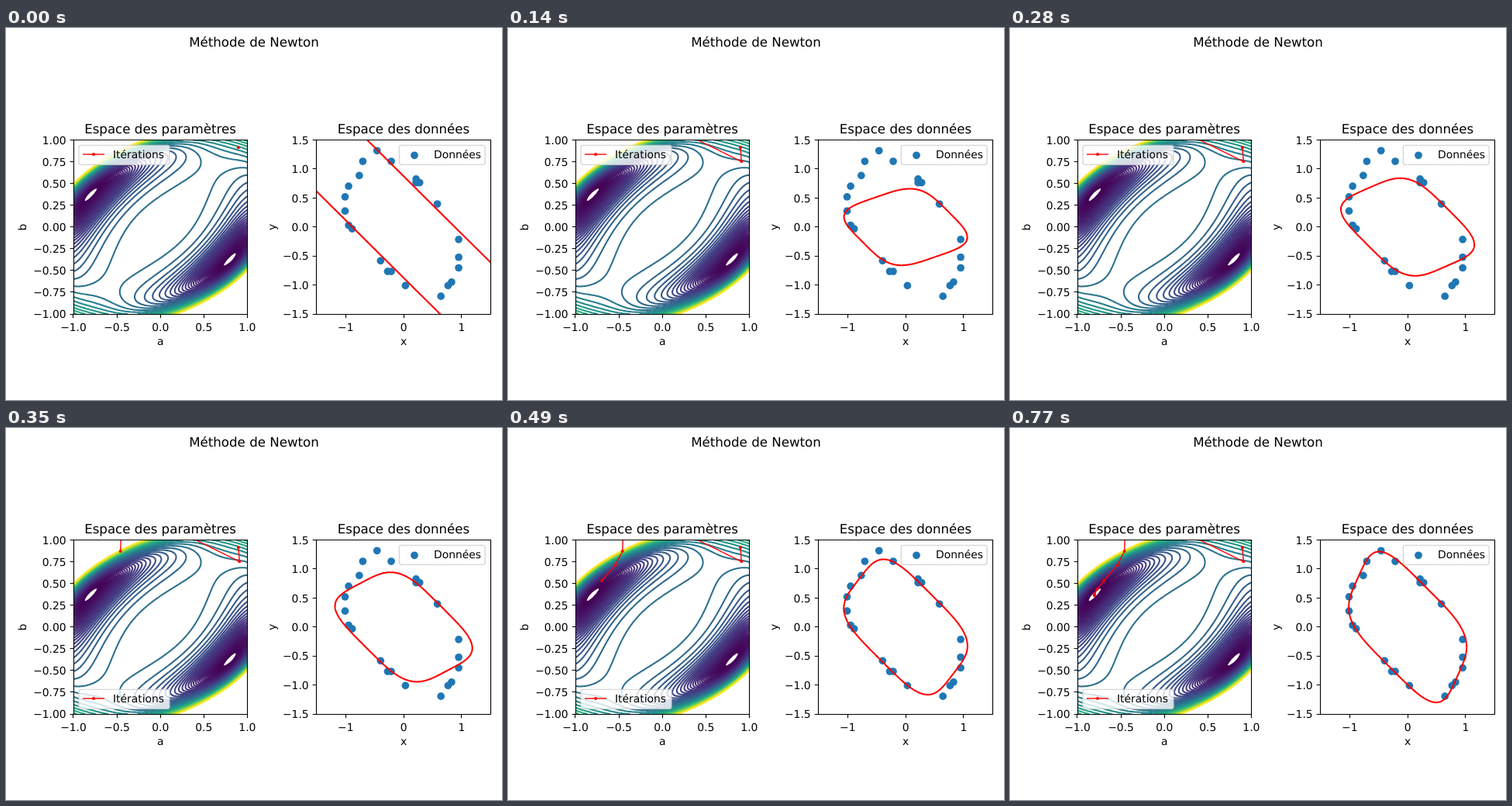
Recreate the animation shown at these times as an HTML page with a canvas. Size 640 by 480 pixels, loop 840 ms.

```html
<!DOCTYPE html>
<html lang="fr">
<head>
<meta charset="utf-8">
<title>Méthode de Newton</title>
<style>
html, body { margin: 0; width: 100%; height: 100%; overflow: hidden; background: #fff; }
canvas, svg { position: absolute; left: 0; top: 0; width: 640px; height: 480px; display: block; }
text { font: 13.89px "DejaVu Sans", sans-serif; text-rendering: geometricPrecision; }
.title { font-size: 16.67px; text-anchor: middle; }
.mid { text-anchor: middle; }
.end { text-anchor: end; }
</style>
</head>
<body>
<canvas id="map" width="640" height="480"></canvas>
<svg id="plot" viewBox="0 0 640 480">
  <clipPath id="clipL"><rect x="87" y="144.5" width="224.4" height="224.5"/></clipPath>
  <clipPath id="clipR"><rect x="400.5" y="144.5" width="224.7" height="224.5"/></clipPath>
  <text class="title" x="320" y="24">Méthode de Newton</text>
  <text class="title" x="199" y="136">Espace des paramètres</text>
  <text class="title" x="513" y="136">Espace des données</text>
  <text class="mid" x="199.3" y="409">a</text>
  <text class="mid" x="513" y="409">x</text>
  <text class="mid" transform="translate(26 257) rotate(-90)">b</text>
  <text class="mid" transform="translate(348 257) rotate(-90)">y</text>
  <g id="dots" fill="#1f77b4" clip-path="url(#clipR)"></g>
  <path id="fit" fill="none" stroke="#f00" stroke-width="2.08" stroke-linejoin="round" clip-path="url(#clipR)"/>
  <g clip-path="url(#clipL)" fill="#f00">
    <path id="track" fill="none" stroke="#f00" stroke-width="1.39" stroke-linejoin="round"/>
    <g id="marks"></g>
  </g>
  <g id="axes" stroke="#000" stroke-width="1.11" fill="none"></g>
  <g id="labels"></g>
  <g id="legend">
    <rect x="94" y="151.4" width="117" height="25" rx="2.8" fill="#fff" fill-opacity=".8" stroke="#ccc" stroke-opacity=".8" stroke-width="1.39"/>
    <path d="M99 163H127" stroke="#f00" stroke-width="1.39"/>
    <circle cx="113" cy="163" r="2" fill="#f00"/>
    <text x="138" y="168">Itérations</text>
  </g>
  <rect x="507.4" y="151.4" width="110.8" height="25" rx="2.8" fill="#fff" fill-opacity=".8" stroke="#ccc" stroke-opacity=".8" stroke-width="1.39"/>
  <circle cx="527" cy="164.3" r="4.86" fill="#1f77b4"/>
  <text x="552" y="168">Données</text>
</svg>
<script>
const $ = id => document.getElementById(id);
const svgNS = "http://www.w3.org/2000/svg";
const STEP = 70, MID = 256.8;
const left = { x: v => 199.2 + 112.2 * v, y: v => MID - 112.2 * v };
const right = { x: v => 513.1 + 74.83 * v, y: v => MID - 74.83 * v };

function add(parent, tag, attrs, text) {
  const el = document.createElementNS(svgNS, tag);
  for (const k in attrs) el.setAttribute(k, attrs[k]);
  if (text) el.textContent = text;
  $(parent).appendChild(el);
}

// Samples lie on a regular grid over [-1.5, 1.5], in odd half steps.
const GRID = 1.5 / 49;
const data = [
  [-15, 43], [-23, 37], [-7, 37], [-25, 29], [-31, 23], [-33, 17], [-33, 9], [-31, 1],
  [-29, -1], [-13, -19], [-9, -25], [-7, -25], [1, -33], [7, 27], [7, 25], [9, 25],
  [19, 13], [31, -7], [31, -17], [31, -23], [27, -31], [25, -33], [21, -39]
].map(p => p.map(n => n * GRID));

// Newton iterates (a, b)
const iters = [
  [.897, .913], [.91, .753], [-.5, 1.447], [-.468, 1.224], [-.453, 1.034], [-.459, .871],
  [-.543, .71], [-.695, .533], [-.775, .432], [-.802, .383], [-.805, .366], [-.806, .364]
];

// Squared error of the model (ax + by)^4 + (x + y)^4 = 1
function loss(a, b) {
  let sum = 0;
  for (const [x, y] of data) sum += ((a * x + b * y) ** 4 + (x + y) ** 4 - 1) ** 2;
  return sum;
}

const viridis = [
  [68, 1, 84], [71, 45, 123], [59, 82, 139], [44, 114, 142], [33, 145, 140],
  [40, 174, 128], [94, 201, 98], [173, 220, 48], [253, 231, 37]
];
function color(t) {
  const p = t * 8, i = Math.min(7, Math.floor(p));
  return `rgb(${viridis[i].map((c, k) => Math.round(c + (viridis[i + 1][k] - c) * (p - i)))})`;
}

function drawMap() {
  const n = 120, low = .5, high = 26, count = 50;
  // Levels grow geometrically, colours follow the level itself.
  const levels = Array.from({ length: count }, (_, k) => low * (high / low) ** (k / (count - 1)));
  const at = i => -1 + 2 * i / n;
  const z = [];
  for (let j = 0; j <= n; j++) {
    z.push([]);
    for (let i = 0; i <= n; i++) z[j].push(loss(at(i), at(j)));
  }
  const paths = levels.map(() => new Path2D());
  for (let j = 0; j < n; j++) for (let i = 0; i < n; i++) {
    const c = [[i, j], [i + 1, j], [i + 1, j + 1], [i, j + 1]];
    const v = c.map(([p, q]) => z[q][p]);
    const min = Math.min(...v), max = Math.max(...v);
    levels.forEach((level, k) => {
      if (level < min || level > max) return;
      const hits = [];
      for (let e = 0; e < 4; e++) {
        const f = (e + 1) % 4;
        if ((v[e] < level) === (v[f] < level)) continue;
        const t = (level - v[e]) / (v[f] - v[e]);
        hits.push([
          left.x(at(c[e][0] + t * (c[f][0] - c[e][0]))),
          left.y(at(c[e][1] + t * (c[f][1] - c[e][1])))
        ]);
      }
      for (let h = 0; h + 1 < hits.length; h += 2) {
        paths[k].moveTo(...hits[h]);
        paths[k].lineTo(...hits[h + 1]);
      }
    });
  }
  const ctx = $("map").getContext("2d");
  ctx.beginPath();
  ctx.rect(87, 144.5, 224.4, 224.5);
  ctx.clip();
  ctx.lineWidth = 2.08;
  ctx.lineCap = "round";
  paths.forEach((p, k) => {
    ctx.strokeStyle = color((levels[k] - low) / (high - low));
    ctx.stroke(p);
  });
}

const num = (v, d) => v.toFixed(d).replace("-", "\u2212");

function drawAxes(x0, x1, map, xs, ys, xd, yd) {
  let d = `M${x0} 144.5H${x1}V369.5H${x0}Z`;
  for (const v of xs) {
    const x = Math.floor(map.x(v)) + .5;
    d += `M${x} 369.5v4.86`;
    add("labels", "text", { class: "mid", x: map.x(v), y: 391 }, num(v, xd));
  }
  for (const v of ys) {
    const y = Math.round(map.y(v) - .5) + .5;
    d += `M${x0} ${y}h-4.86`;
    add("labels", "text", { class: "end", x: x0 - 9.8, y: Math.round(map.y(v) + 5.2) }, num(v, yd));
  }
  add("axes", "path", { d });
}

const range = (from, step, n) => Array.from({ length: n }, (_, i) => from + step * i);

function fitPath([a, b]) {
  const root = v => Math.sign(v) * Math.sqrt(Math.abs(v));
  const n = 1440, pts = [];
  for (let i = 0; i < n; i++) {
    const t = 2 * Math.PI * (i + .5) / n;
    const u = root(Math.cos(t)), v = root(Math.sin(t));
    const y = (v - a * u) / (b - a);
    pts.push(right.x(u - y).toFixed(2) + " " + right.y(y).toFixed(2));
  }
  return "M" + pts.join("L") + "Z";
}

const fits = iters.map(fitPath);
const spots = iters.map(([a, b]) => [left.x(a), left.y(b)]);

drawMap();
drawAxes(87.5, 311.5, left, range(-1, .5, 5), range(-1, .25, 9), 1, 2);
drawAxes(400.5, 625.5, right, range(-1, 1, 3), range(-1.5, .5, 7), 0, 1);
for (const [x, y] of data) add("dots", "circle", { cx: right.x(x), cy: right.y(y), r: 4.86 });
for (const [cx, cy] of spots) add("marks", "circle", { cx, cy, r: 2 });

let shown = -1;
function show(k) {
  if (k === shown) return;
  shown = k;
  $("fit").setAttribute("d", fits[k]);
  $("track").setAttribute("d", "M" + spots.slice(0, k + 1).map(p => p.join(" ")).join("L"));
  [...$("marks").children].forEach((m, i) => m.setAttribute("visibility", i <= k ? "visible" : "hidden"));
  // The legend moves down once the track reaches its corner.
  $("legend").setAttribute("transform", `translate(0 ${k < 5 ? 0 : 186})`);
}

let start = null;
function tick(now) {
  if (start === null) start = now;
  show(Math.floor((now - start) / STEP) % iters.length);
  requestAnimationFrame(tick);
}
show(0);
requestAnimationFrame(tick);
</script>
</body>
</html>
```
